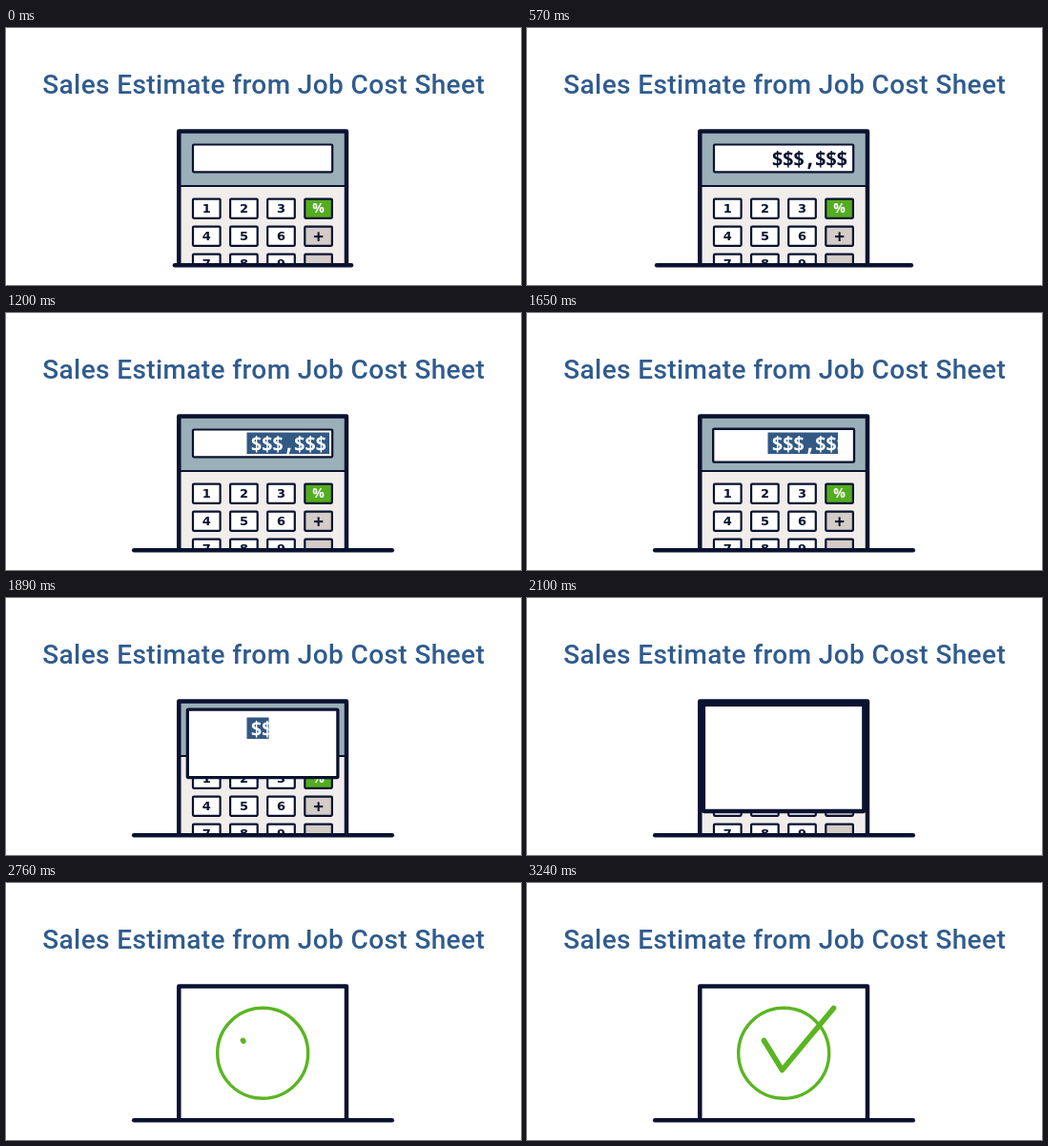
Write an HTML page that moves like this. It is 540 px wide and 270 px high and loops after 3330 ms.

```html
<!DOCTYPE html>
<html lang="en">
<head>
<meta charset="utf-8">
<title>Sales Estimate from Job Cost Sheet</title>
<style>
  html, body { margin: 0; width: 100%; height: 100%; overflow: hidden; background: #fff; }
  svg { display: block; width: 100%; height: 100%; }
  .title { font: 500 28px Roboto, sans-serif; letter-spacing: .38px; fill: #305b8e; text-anchor: middle; }
  .amount { font: 600 22px "Noto Sans Mono", monospace; letter-spacing: -1.9px; }
  .key { font: 700 13px "DejaVu Sans", sans-serif; fill: #0a1230; text-anchor: middle; }
  .key.sym { font: 700 14px "Noto Sans", sans-serif; }
  .key.plus { font: 600 19px "Noto Sans", sans-serif; }
  .ink { stroke: #0a1230; }
  .tick { stroke: #5ab522; fill: none; stroke-linecap: round; stroke-linejoin: round; }
</style>
</head>
<body>
<svg viewBox="0 0 540 270">
  <defs>
    <clipPath id="bodyClip"><rect x="179" y="106" width="180" height="142"/></clipPath>
    <clipPath id="plainClip"><rect id="plainBox" x="250" y="122" height="30"/></clipPath>
    <clipPath id="markClip"><rect id="markBox" y="122" height="30"/></clipPath>
  </defs>
  <rect width="540" height="270" fill="#fff"/>
  <text class="title" x="270.2" y="69">Sales Estimate from Job Cost Sheet</text>

  <g id="calc" clip-path="url(#bodyClip)">
    <rect x="181" y="108" width="176" height="58" fill="#9aafb8"/>
    <rect x="181" y="166" width="176" height="83" fill="#f0edeb"/>
    <path class="ink" d="M181 166H357" stroke-width="2.2"/>
    <g id="keys"></g>
  </g>
  <path class="ink" d="M181.3 249V108.4H357V249" fill="none" stroke-width="4.5" stroke-linejoin="round"/>
  <rect id="display" class="ink" fill="#fff" rx="1" stroke-linejoin="round"/>

  <g class="amount">
    <text x="256" y="145.3" fill="#0a1230" clip-path="url(#plainClip)">$$$,$$$</text>
    <g clip-path="url(#markClip)">
      <rect x="252.5" y="125.5" width="86.5" height="22.5" fill="#315984"/>
      <text x="256" y="145.3" fill="#fff">$$$,$$$</text>
    </g>
  </g>

  <path id="base" class="ink" stroke-width="4.5" stroke-linecap="round"/>
  <circle id="ring" class="tick" cx="269.2" cy="178.8" r="47.5" stroke-width="3.4"
          pathLength="1" transform="rotate(-90 269.2 178.8)"/>
  <path id="check" class="tick" d="M248.5 165.5L267.5 196.5L321.5 131.5" stroke-width="5.6" pathLength="1"/>
</svg>
<script>
const LOOP = 3330;
const MID = 269.5;
const $ = id => document.getElementById(id);
const set = (el, attrs) => { for (const k in attrs) el.setAttribute(k, attrs[k]); };
const mix = (a, b, p) => a + (b - a) * p;

// Eased progress from 0 to 1 between two times
function ease(t, from, to) {
  const p = Math.min(1, Math.max(0, (t - from) / (to - from)));
  return (1 - Math.cos(Math.PI * p)) / 2;
}

// Half width of the base line: a damped swing, [ms, px]
const swing = [[0, 92.3], [270, 140.8], [560, 133.4], [820, 136.4], [1140, 135.3]];
function halfWidth(t) {
  const i = swing.findIndex(s => s[0] > t);
  if (i < 0) return swing[swing.length - 1][1];
  const [t0, a] = swing[i - 1], [t1, b] = swing[i];
  const p = i === 1 ? Math.sin(Math.PI / 2 * (t - t0) / (t1 - t0)) : ease(t, t0, t1);
  return mix(a, b, p);
}

function drawKeys() {
  const rows = ["123%", "456+", "789 "];
  let out = "";
  rows.forEach((row, r) => [...row].forEach((label, c) => {
    const x = 196 + c * 39.1, y = 179.6 + r * 29;
    const fill = c < 3 ? "#fff" : r ? "#d3ccc7" : "#54ad20";
    const kind = label === "%" ? " sym" : label === "+" ? " plus" : "";
    const paint = label === "%" ? ' style="fill:#fff"' : "";
    const drop = label === "+" ? 17.2 : 14.8;
    out += `<rect class="ink" x="${x}" y="${y}" width="28.6" height="20.2" rx="1" fill="${fill}" stroke-width="2.2"/>` +
      `<text class="key${kind}"${paint} x="${x + 14.3}" y="${y + drop}">${label}</text>`;
  }));
  $("keys").innerHTML = out;
}

function stroke(id, p) {
  set($(id), { "stroke-dasharray": `${p} 2`, visibility: p > 0 ? "visible" : "hidden" });
}

function render(t) {
  const half = halfWidth(t);
  set($("base"), { d: `M${MID - half} 249.2H${MID + half}` });

  const typed = mix(254, 341, ease(t, 20, 550));
  const marked = mix(339, 252, ease(t, 600, 1140));
  const cut = mix(339, 252, ease(t, 1500, 2100));
  const plainEnd = t < 600 ? typed : marked;
  set($("plainBox"), { width: Math.max(0, plainEnd - 250) });
  set($("markBox"), { x: marked, width: Math.max(0, cut - marked) });

  const grow = ease(t, 1520, 2390);
  const x = mix(196, 181.3, grow), y = mix(122.5, 108.4, grow);
  set($("display"), {
    x, y,
    width: mix(342.2, 357, grow) - x,
    height: mix(151.3, 248, grow) - y,
    "stroke-width": mix(2.2, 5, grow),
    opacity: 1 - ease(t, 2430, 2560)
  });
  set($("calc"), { visibility: t < 2390 ? "visible" : "hidden" });

  stroke("ring", ease(t, 2390, 2760));
  stroke("check", ease(t, 2740, 3160));
}

drawKeys();
render(0);
const start = performance.now();
function tick() {
  render((performance.now() - start) % LOOP);
  requestAnimationFrame(tick);
}
requestAnimationFrame(tick);
</script>
</body>
</html>
```
